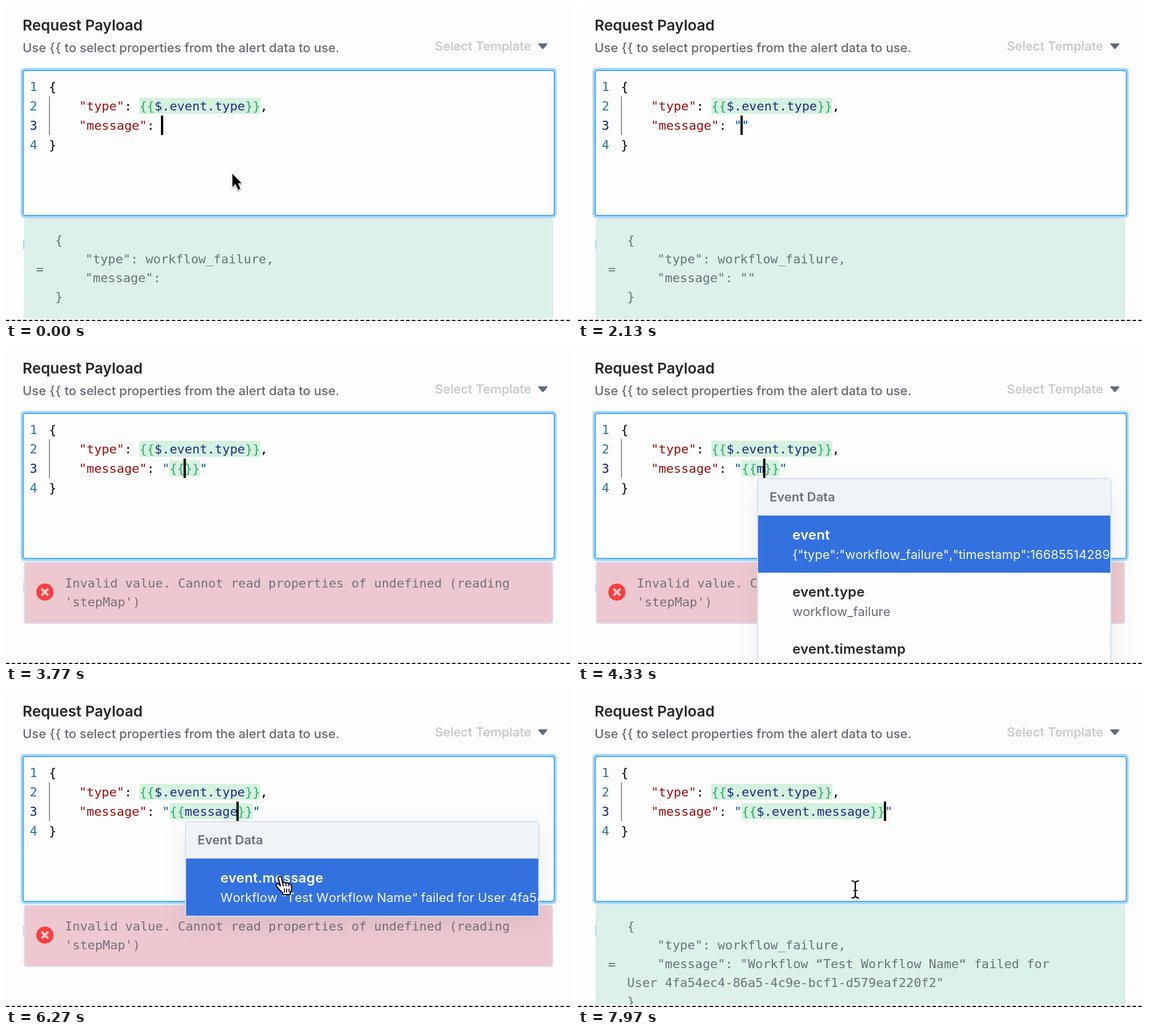
An HTML page that plays this animation: 990 px wide and 552 px high, repeating every 8000 ms.

```html
<!DOCTYPE html>
<html lang="en">
<head>
<meta charset="utf-8">
<title>Request Payload</title>
<style>
  html, body { margin: 0; width: 100%; height: 100%; overflow: hidden; background: #fdfdfd; }
  svg { display: block; }
  text { font: 400 22px Inter, sans-serif; white-space: pre; }
  .mono text { font: 21.92px "DejaVu Sans Mono", monospace; }
  .medium { font-weight: 500; }
  .strong { font-weight: 600; }
  .name { font-weight: 600; font-size: 24px; letter-spacing: .2px; }
  .sub { font-kerning: none; }
  #menu { filter: drop-shadow(0 14px 18px rgba(50, 60, 90, .09)); }
  #arrow { filter: drop-shadow(0 2px 1.5px rgba(0, 0, 0, .35)); }
</style>
</head>
<body>
<svg width="990" height="552" viewBox="0 0 990 552">
  <defs>
    <clipPath id="page"><rect width="990" height="548"/></clipPath>
    <clipPath id="rows"><rect x="315" y="228" width="617" height="330"/></clipPath>
  </defs>
  <rect width="990" height="552" fill="#fdfdfd"/>
  <g clip-path="url(#page)">
    <text class="strong" x="29" y="43" fill="#24272c" style="font-size:26px">Request Payload</text>
    <text class="medium" x="29" y="81" fill="#646a75">Use <tspan letter-spacing=".6">{{</tspan> to select properties from the alert data to use.</text>
    <text class="medium" x="750" y="78" fill="#c3c6cc">Select Template</text>
    <path d="M932 66.5h14l-7 8z" fill="#5f6b7c" stroke="#5f6b7c" stroke-width="2" stroke-linejoin="round"/>
    <rect x="30" y="410" width="2" height="16" fill="#9fd0fb"/>

    <rect x="25.5" y="108.5" width="937.5" height="263" rx="7" fill="#a3d7fc"/>
    <rect x="30" y="113" width="929" height="254" rx="4" fill="#fdfdfd" stroke="#48aaf6" stroke-width="2"/>
    <rect x="75" y="158" width="2" height="68" fill="#939393"/>
    <g id="code" class="mono"></g>
    <rect id="caret" y="192" width="4" height="34"/>

    <g id="preview" class="mono" fill="#6a737b">
      <rect x="32" y="372.5" width="924.5" height="174.5" rx="4" fill="#dcf1e9" stroke="#d3e2ef"/>
      <g id="result"></g>
    </g>
    <g id="error" class="mono" fill="#74707b">
      <rect x="32" y="373.5" width="924" height="107.5" rx="4" fill="#eec8d0" stroke="#d9e1f2" stroke-width="2"/>
      <circle cx="68" cy="426" r="15" fill="#ff3e3d"/>
      <path d="M62 420l12 12M74 420l-12 12" stroke="#f3cdd4" stroke-width="4"/>
      <text x="103" y="418">Invalid value. Cannot read properties of undefined (reading</text>
      <text x="103" y="451">'stepMap')</text>
    </g>

    <g id="menu">
      <rect id="box" x="314" y="227" width="618" rx="5" fill="#fdfdfd" stroke="#d5e1f0" stroke-width="2"/>
      <path d="M315 291v-59q0-4 4-4h608q4 0 4 4v59z" fill="#f1f4f7"/>
      <path d="M315 291h616" stroke="#dbe5f1" stroke-width="2"/>
      <text class="strong" x="335" y="267" fill="#6a717c">Event Data</text>
      <rect x="315" y="292" width="616" height="100" rx="1" fill="#3371df"/>
      <g id="items" clip-path="url(#rows)"></g>
    </g>

    <g id="mouse">
      <path id="arrow" d="M1 2V25L6.500 20l4.500 10 4-1.700L10.700 18.500H17z" stroke="#fff" stroke-width="2" stroke-linejoin="round" paint-order="stroke"/>
      <g id="hand" stroke="#000" stroke-width="2" stroke-linejoin="round" stroke-linecap="round">
        <path d="M-3 2Q-3-1 0-1T3 2L5 11Q7 8 10 11 12 9 15 12 19 11 20 16 22 22 18 27V31H5V28Q-1 23-6 16-8 12-4 12-2 12 1 16z" fill="#fff"/>
        <path d="M5 11l1 5M10 11l1 5M15 12l1 4M8 21v6M12 21v6M16 21v5" fill="none" stroke-width="1.700"/>
      </g>
      <path id="beam" d="M-6.500-15Q0-15 0-10V10Q0 15-6.500 15M6.500-15Q0-15 0-10M0 10Q0 15 6.500 15M-3.500 2h7" fill="none" stroke="#000" stroke-width="2.200"/>
    </g>
  </g>
  <path d="M0 551H990" stroke="#000" stroke-width="2" stroke-dasharray="6 4"/>
</svg>
<script>
const LOOP = 8000, X0 = 75, CW = 13.2;
const FAIL = 2550, OPEN = 3850, FILTER = 5400, HOVER = 5700, PICK = 6750;
const $ = id => document.getElementById(id);
const esc = s => s.replace(/&/g, '&amp;').replace(/</g, '&lt;');
const text = (x, y, s, fill = '', cls = '') =>
  `<text x="${x}" y="${y}"${fill && ` fill="${fill}"`}${cls && ` class="${cls}"`}>${esc(s)}</text>`;
const color = { key: '#970f10', str: '#0451a5', brace: '#2fae68', name: '#1e2d86', num: '#237893', active: '#0b216f' };

// Each edit: time, value on line 3, caret offset within it
const edits = [
  [-400, '', 0], [1850, '""', 1], [2200, '"{"', 2], [2450, '"{{"', 3],
  [2950, '"{{}"', 4], [3130, '"{{}}"', 5], [3450, '"{{}}"', 4], [3600, '"{{}}"', 3],
  ...[...'message'].map((_, i) => [4250 + 120 * i, `"{{${'message'.slice(0, i + 1)}}}"`, 4 + i]),
  [PICK, '"{{$.event.message}}"', 20]
];

const html = {};
function fill(id, markup) {
  if (html[id] !== markup) $(id).innerHTML = html[id] = markup;
}
function show(id, on) {
  $(id).style.display = on ? '' : 'none';
}

function tokens(row, col, parts) {
  const y = 149 + 34 * row;
  return parts.map(([s, c]) => {
    const out = text(X0 + col * CW, y, s, c);
    col += s.length;
    return out;
  }).join('');
}
function variable(row, col, name) {
  const width = (name.length + 4) * CW;
  return `<rect x="${X0 + col * CW}" y="${127 + 34 * row}" width="${width}" height="28" fill="#d4f2df"/>` +
    tokens(row, col, [['{{', color.brace], [name, color.name], ['}}', color.brace]]);
}
function codeMarkup(value) {
  let out = [1, 2, 3, 4].map((n, i) =>
    text(41.5, 149 + 34 * i, '' + n, n === 3 ? color.active : color.num)).join('');
  out += tokens(0, 0, [['{', '#000']]) + tokens(3, 0, [['}', '#000']]);
  out += tokens(1, 4, [['"type"', color.key], [':', '#000']]);
  out += variable(1, 12, '$.event.type') + tokens(1, 28, [[',', '#000']]);
  out += tokens(2, 4, [['"message"', color.key], [':', '#000']]);
  const match = value.match(/{{(.*)}}/);
  if (!match) return out + tokens(2, 15, [[value, color.str]]);
  return out + variable(2, 16, match[1]) +
    tokens(2, 15, [['"', color.str]]) + tokens(2, 14 + value.length, [['"', color.str]]);
}

function resultMarkup(value, picked) {
  const lines = ['{', '    "type": workflow_failure,', '    "message": ' + value, '}'];
  if (picked) {
    lines[2] = '    "message": "Workflow “Test Workflow Name“ failed for';
    lines.splice(3, 0, 'User 4fa54ec4-86a5-4c9e-bcf1-d579eaf220f2"');
  }
  return lines.map((s, i) => text(86, 418 + 33 * i, s)).join('') + text(52.5, picked ? 485 : 469, '=');
}

function itemsMarkup(filtered) {
  const items = filtered
    ? [['event.message', 'Workflow “Test Workflow Name“ failed for User 4fa54ec4']]
    : [['event', '{"type":"workflow_failure","timestamp":1668551428900'],
       ['event.type', 'workflow_failure'], ['event.timestamp', '']];
  return items.map(([name, sub], i) =>
    text(375, 334 + 100 * i, name, i ? '#24272c' : '#fff', 'name') +
    text(375, 368 + 100 * i, sub, i ? '#666c76' : '#f3f7ff', 'sub')).join('');
}

const ease = (t, a, b) => {
  const p = Math.min(1, Math.max(0, (t - a) / (b - a)));
  return p * p * (3 - 2 * p);
};

function render(t) {
  const [since, value, offset] = edits.filter(e => e[0] <= t).pop();
  const picked = t >= PICK, failed = t >= FAIL && !picked;
  fill('code', codeMarkup(value));
  $('caret').setAttribute('x', X0 + (15 + offset) * CW - 2);
  show('caret', (t - since) % 1000 < 500);

  show('error', failed);
  show('preview', !failed);
  if (!failed) fill('result', resultMarkup(value, picked));

  const filtered = t >= FILTER;
  show('menu', t >= OPEN && !picked);
  fill('items', itemsMarkup(filtered));
  $('box').setAttribute('height', filtered ? 166 : 370);

  const go = ease(t, HOVER, 6150), drop = ease(t, 6850, 7150);
  const x = 395 + 84 * go + 6 * drop, y = 292 + 32 * go + 22 * drop;
  $('mouse').setAttribute('transform', `translate(${x} ${y})`);
  show('arrow', t < edits[1][0]);
  show('hand', t >= HOVER && !picked);
  show('beam', picked);
}

function tick() {
  render(performance.now() % LOOP);
  requestAnimationFrame(tick);
}
tick();
</script>
</body>
</html>
```
